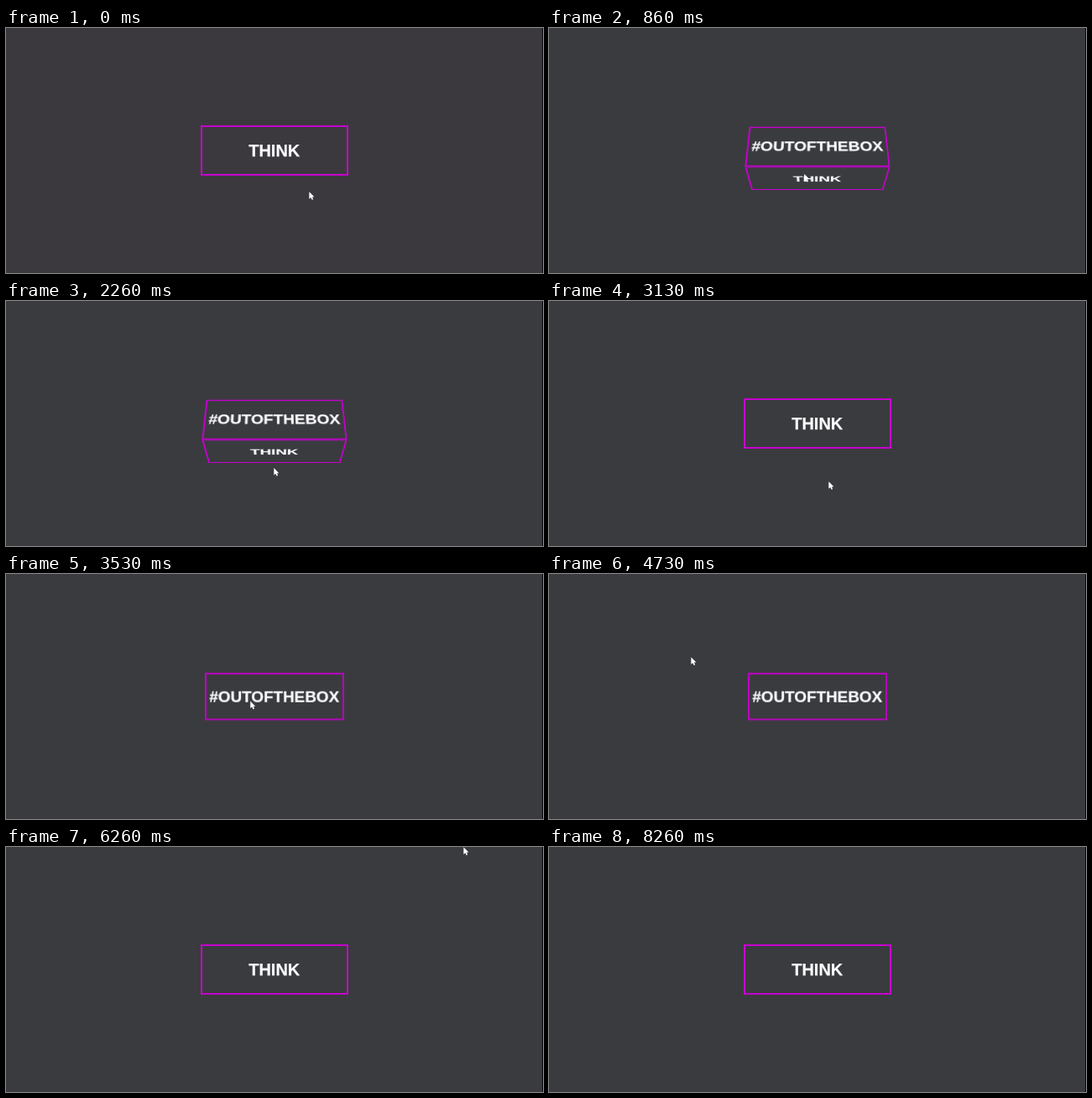
An HTML page that plays this animation: 640x292 px, repeating every 8.86 s.

```html
<!DOCTYPE html>
<html lang="en">
<head>
<meta charset="utf-8">
<title>Box flip</title>
<style>
  html, body { margin: 0; width: 100%; height: 100%; overflow: hidden; background: #3a3b3e; }
  #stage {
    position: absolute; left: 0; top: 0; width: 640px; height: 292px; overflow: hidden;
    perspective: 490px; perspective-origin: 320px 146px;
  }
  #edge { position: absolute; right: 0; top: 0; width: 1px; height: 100%; background: #050506; }
  #cube { position: absolute; left: 232px; top: 116px; width: 175.5px; height: 60px; transform-style: preserve-3d; }
  .face {
    position: absolute; inset: 0; box-sizing: border-box; border: 2px solid #c600ce;
    font: bold 20px/56px "Liberation Sans", Arial, sans-serif; color: #fbfbff;
    -webkit-text-stroke: .25px #fbfbff;
    display: flex; justify-content: center; white-space: nowrap;
    backface-visibility: hidden;
  }
  .front { transform: translateZ(30px); }
  .top { transform: rotateX(90deg) translateZ(30px); }
  #cursor { position: absolute; left: 0; top: 0; width: 9px; height: 12px; overflow: visible; }
</style>
</head>
<body>
<div id="stage">
  <div id="edge"></div>
  <div id="cube">
    <div class="face front">THINK</div>
    <div class="face top">#OUTOFTHEBOX</div>
  </div>
  <svg id="cursor" viewBox="0 0 8 11">
    <path d="M.2 .2V8L2 6.4 3.2 9 4.6 8.5 3.5 6 5.7 5.8Z" fill="#fff"/>
  </svg>
</div>
<script>
const LOOP = 8860, FPS = 15;
const FLIP_TICKS = 3, CURSOR_GONE = 124, TINT_END = 6;
const stage = document.getElementById('stage');
const cube = document.getElementById('cube');
const cursor = document.getElementById('cursor');

const clamp = v => Math.min(1, Math.max(0, v));
const easeOut = k => 1 - (1 - k) ** 2;

// Times are in ticks, 15 per second.
const hovers = [{ enter: 11.1, leave: 32.9 }, { enter: 49, leave: 71 }];
const home = { x: 361, y: 195 };
const moves = [
  { from: 5, to: 18, x: 294, y: 170 },
  { from: 30, to: 40, x: 333, y: 215 },
  { from: 47, to: 54, x: 290, y: 150 },
  { from: 70, to: 71, x: 169, y: 99 },
  { from: 71, to: 74, x: 124, y: 122 },
  { from: 78, to: 81, x: 97, y: 152 },
  { from: 81, to: 94, x: 545, y: 0 }
];

// The box turns while hovered and turns back at the same speed.
function flipAt(tick) {
  const turns = hovers.map(h =>
    clamp((tick - h.enter) / FLIP_TICKS) - clamp((tick - h.leave) / FLIP_TICKS));
  return Math.max(...turns);
}

function cursorAt(tick) {
  return moves.reduce((p, move) => {
    const k = easeOut(clamp((tick - move.from) / (move.to - move.from)));
    return { x: p.x + (move.x - p.x) * k, y: p.y + (move.y - p.y) * k };
  }, home);
}

function draw(ms) {
  const tick = Math.floor((ms + 7) * FPS / 1000);
  const flip = flipAt(tick);
  const { x, y } = cursorAt(tick);
  const dip = 47 * flip * (1 - flip);
  const depth = -30 - 30 * flip;
  cube.style.transform = `translate3d(0, ${dip}px, ${depth}px) rotateX(${-90 * flip}deg)`;
  cursor.style.transform = `translate(${x}px, ${y}px)`;
  cursor.style.visibility = tick < CURSOR_GONE ? 'visible' : 'hidden';
  stage.style.background = tick < TINT_END ? '#3c393e' : '#3a3b3e';
}

const start = performance.now();
function loop() {
  draw((performance.now() - start) % LOOP);
  requestAnimationFrame(loop);
}
loop();
</script>
</body>
</html>
```
